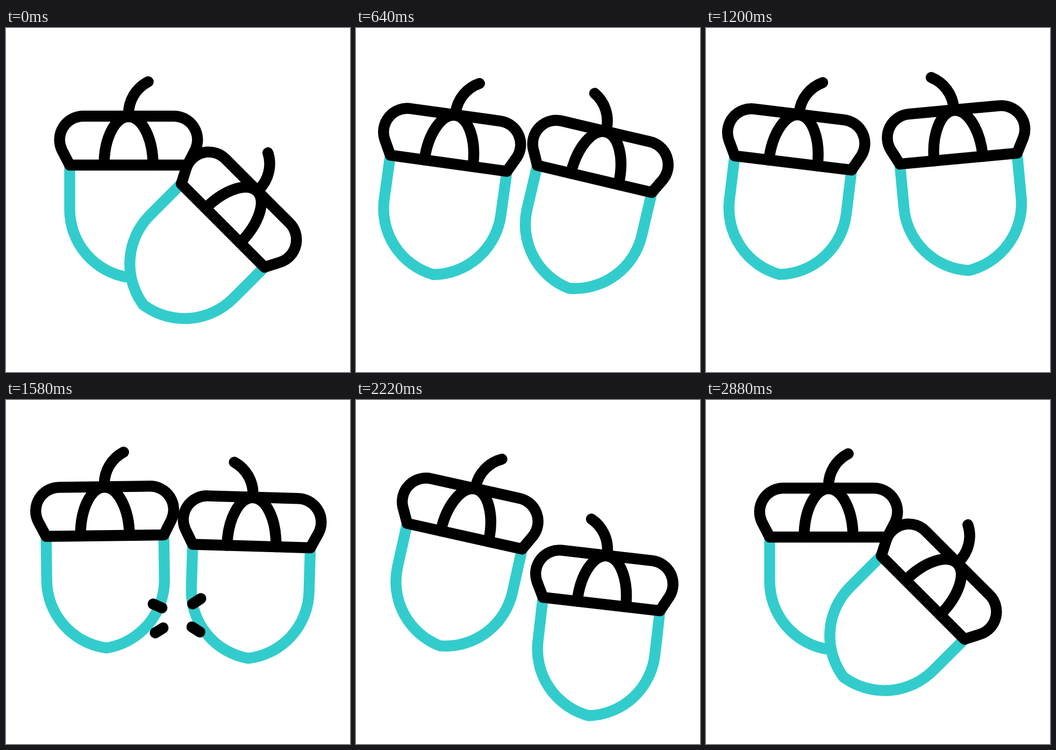
An HTML page for the animation above (3.6 s loop, 640 by 640 pixels).

```html
<!DOCTYPE html>
<html lang="en">
<head>
<meta charset="utf-8">
<title>Acorns</title>
<style>
html, body { margin: 0; width: 100%; height: 100%; overflow: hidden; background: #fff; }
svg { display: block; width: 100%; height: 100%; }
</style>
</head>
<body>
<svg viewBox="0 0 640 640" fill="none" stroke="#000" stroke-width="20.4" stroke-linecap="round" stroke-linejoin="round">
  <defs>
    <g id="acorn">
      <path d="M-109.5 0V82A128 128 0 0 0 0 209A128 128 0 0 0 109.5 82V0" fill="#fff" stroke="#3cc" stroke-linecap="butt" stroke-linejoin="miter"/>
      <path d="M-109.5 0L-124 -28A44 44 0 0 1 -84 -91H84A44 44 0 0 1 124 -28L109.5 0Z" fill="#fff"/>
      <path d="M-45.5 0C-45.5 -50 -25 -90 0 -90S45.5 -50 45.5 0M0 -95A67 67 0 0 1 36.5 -155"/>
    </g>
  </defs>
  <use id="left" href="#acorn"/>
  <use id="right" href="#acorn"/>
  <path id="sparks"/>
</svg>
<script>
const LOOP = 3600, CLAP = 1420;

const smooth = u => (1 - Math.cos(Math.PI * u)) / 2;
const rebound = u => Math.sin(Math.PI / 2 * u);

// turning points [time, value, easing that follows]
const leftX = [[0, 228], [1020, 148], [1460, 187], [1800, 177], [2650, 228]];
const leftTilt = [[140, 0], [1080, 14.3], [CLAP, -12, rebound], [2020, 15.5], [2720, 0]];
const rightX = [[200, 403.5], [1040, 478.5], [1460, 451], [1880, 481], [2780, 403.5]];
const rightY = [[0, 367.5], [1020, 243], [1240, 243], [2400, 388], [2780, 367.5]];
const rightTilt = [[140, 45], [1080, -12.5], [CLAP, 13, rebound], [1900, -9.5], [2780, 45]];

// start and end point of each spark
const sparks = [
  [301, 391.5, 262.5, 374.5],
  [302, 418, 267.5, 439.5],
  [337, 386, 373, 362.5],
  [336, 416, 371, 438]
];

const $ = id => document.getElementById(id);
const mix = (a, b, p) => a + (b - a) * p;

function follow(track, t) {
  const next = track.findIndex(key => key[0] > t);
  if (next === 0) return track[0][1];
  if (next < 0) return track[track.length - 1][1];
  const [t0, v0, ease = smooth] = track[next - 1];
  const [t1, v1] = track[next];
  return mix(v0, v1, ease((t - t0) / (t1 - t0)));
}

function place(id, x, y, tilt, flip) {
  $(id).setAttribute('transform', `translate(${x} ${y}) rotate(${tilt}) scale(${flip} 1)`);
}

function sparkPath(t) {
  const u = (t - 1400) / 480;
  if (u <= 0 || u >= 1) return '';
  const tail = u ** 1.3, head = 1 - (1 - u) ** 2.6;
  return sparks.map(([x0, y0, x1, y1]) => {
    const at = p => `${mix(x0, x1, p)} ${mix(y0, y1, p)}`;
    return `M${at(tail)}L${at(head)}`;
  }).join('');
}

function draw(t) {
  const x = follow(leftX, t);
  place('left', x, 255 - 0.06 * (228 - x), follow(leftTilt, t), 1);
  place('right', follow(rightX, t), follow(rightY, t), follow(rightTilt, t), -1);
  $('sparks').setAttribute('d', sparkPath(t));
}

const start = performance.now();
function tick() {
  draw((performance.now() - start) % LOOP);
  requestAnimationFrame(tick);
}
tick();
</script>
</body>
</html>
```
